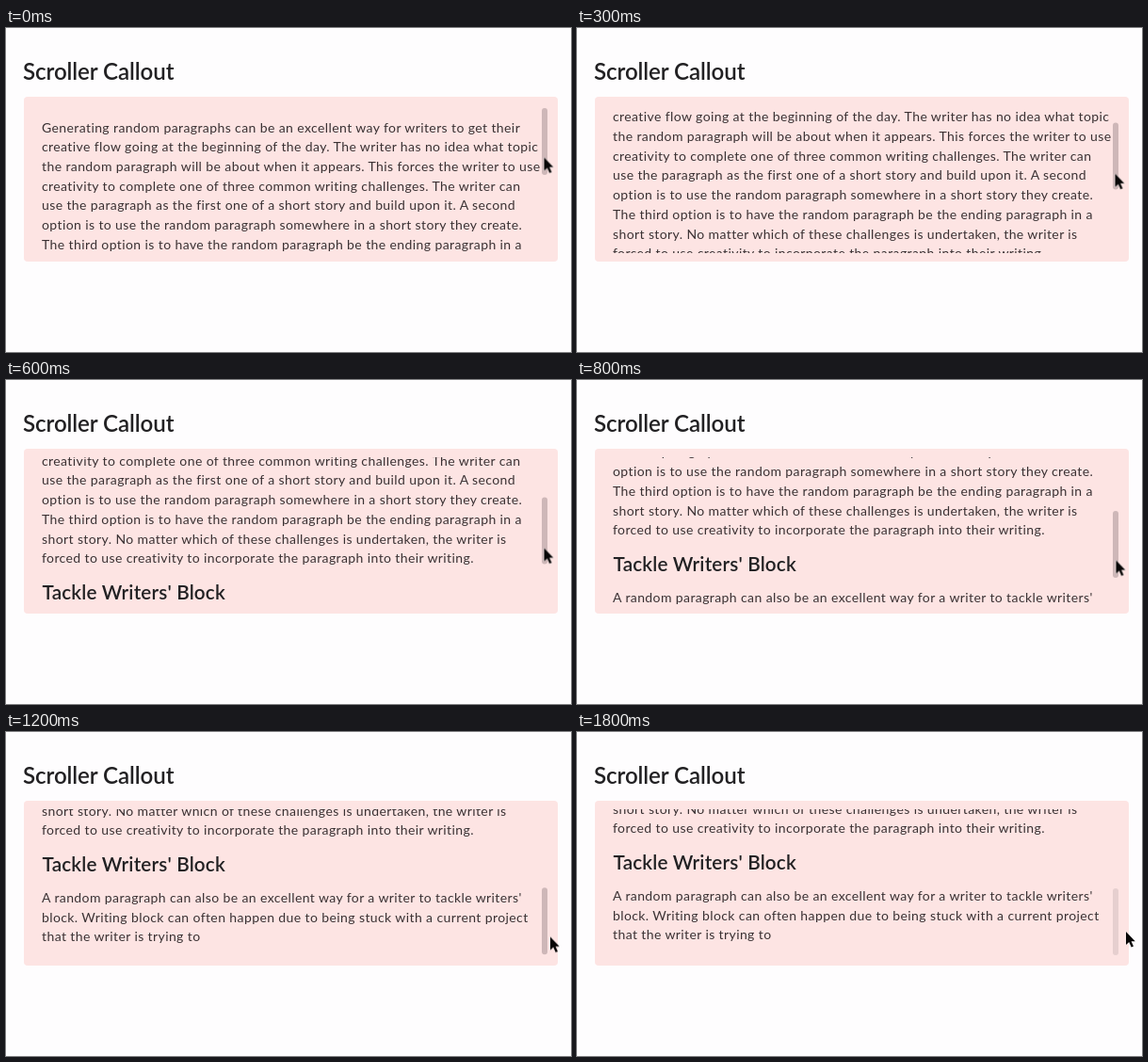
An HTML page for the animation above (2200 ms loop, 600x344 px).

```html
<!DOCTYPE html>
<html lang="en">
<head>
<meta charset="utf-8">
<title>Scroller Callout</title>
<style>
  @property --scroll {
    syntax: "<number>";
    inherits: true;
    initial-value: 0;
  }

  html, body {
    margin: 0;
    width: 100%;
    height: 100%;
    overflow: hidden;
    background: #fefdfe;
  }

  .stage {
    position: relative;
    width: 600px;
    height: 344px;
    overflow: hidden;
    color: #3a3133;
    font: 14px/20.72px Lato, sans-serif;
    letter-spacing: .0285em;
    animation: scroll 2200ms steps(2) infinite;
  }

  h1, h2, p { margin: 0; white-space: nowrap; }
  h1, h2 { color: #222123; font-weight: 600; }

  h1 {
    position: absolute;
    left: 18px;
    top: 31px;
    font-size: 24.15px;
    line-height: 30px;
    letter-spacing: -.004em;
  }

  h2 {
    margin: 12.7px 0 14.1px .5px;
    font-size: 20.7px;
    line-height: 24px;
    letter-spacing: .008em;
  }

  .callout, .view, .thumb, .cursor { position: absolute; }

  .callout {
    left: 19px;
    top: 73px;
    width: 567px;
    height: 175px;
    border-radius: 4px;
    background: #fde4e3;
  }

  .view {
    left: 19px;
    top: 82px;
    width: 567px;
    height: 157px;
    overflow: hidden;
  }

  .content {
    padding: 13.6px 0 0 19px;
    transform: translateY(calc(var(--scroll) * -1px));
  }

  .thumb {
    left: 568.5px;
    top: 85px;
    width: 6.5px;
    height: 71px;
    border-radius: 3.25px;
    background: #ceb7b8;
    transform: translateY(calc(var(--scroll) * .48px));
    animation: release 2200ms step-end infinite;
  }

  .cursor {
    left: .5px;
    top: .3px;
    overflow: visible;
    animation: drag 2200ms steps(2) infinite;
  }

  @keyframes scroll {
    0% { --scroll: 0; }
    9.09% { --scroll: 18; }
    18.18% { --scroll: 47; }
    27.27% { --scroll: 82.3; }
    36.36% { --scroll: 112.5; }
    45.45% { --scroll: 142; }
    54.54% { --scroll: 167; }
    63.63%, 100% { --scroll: 169; }
  }

  @keyframes drag {
    0% { transform: translate(570.5px, 137.5px); }
    9.09% { transform: translate(570.5px, 147.5px); }
    18.18% { transform: translate(570.5px, 162px); }
    27.27% { transform: translate(570.5px, 178.5px); }
    36.36% { transform: translate(571.5px, 191.5px); }
    45.45% { transform: translate(574px, 205px); }
    54.54% { transform: translate(577px, 217.5px); }
    63.63% { transform: translate(579px, 218px); animation-timing-function: steps(4); }
    81.81%, 100% { transform: translate(582px, 212px); }
  }

  @keyframes release {
    0% { background: #ceb7b8; }
    68.18%, 100% { background: #e6cfcf; }
  }
</style>
</head>
<body>
<main class="stage">
  <h1>Scroller Callout</h1>
  <div class="callout"></div>
  <div class="view">
    <div class="content">
      <p>Generating random paragraphs can be an excellent way for writers to get their<br>
        creative flow going at the beginning of the day. The writer has no idea what topic<br>
        the random paragraph will be about when it appears. This forces the writer to use<br>
        creativity to complete one of three common writing challenges. The writer can<br>
        use the paragraph as the first one of a short story and build upon it. A second<br>
        option is to use the random paragraph somewhere in a short story they create.<br>
        The third option is to have the random paragraph be the ending paragraph in a<br>
        short story. No matter which of these challenges is undertaken, the writer is<br>
        forced to use creativity to incorporate the paragraph into their writing.</p>
      <h2>Tackle Writers' Block</h2>
      <p>A random paragraph can also be an excellent way for a writer to tackle writers'<br>
        block. Writing block can often happen due to being stuck with a current project<br>
        that the writer is trying to</p>
    </div>
  </div>
  <div class="thumb"></div>
  <svg class="cursor" width="12" height="18">
    <path d="M0 0V14L3.2 11L5.7 16.5L8 15.5L5.6 10.2H9.8Z" fill="#080606" stroke="#fff" stroke-width=".6" paint-order="stroke"/>
  </svg>
</main>
</body>
</html>
```
